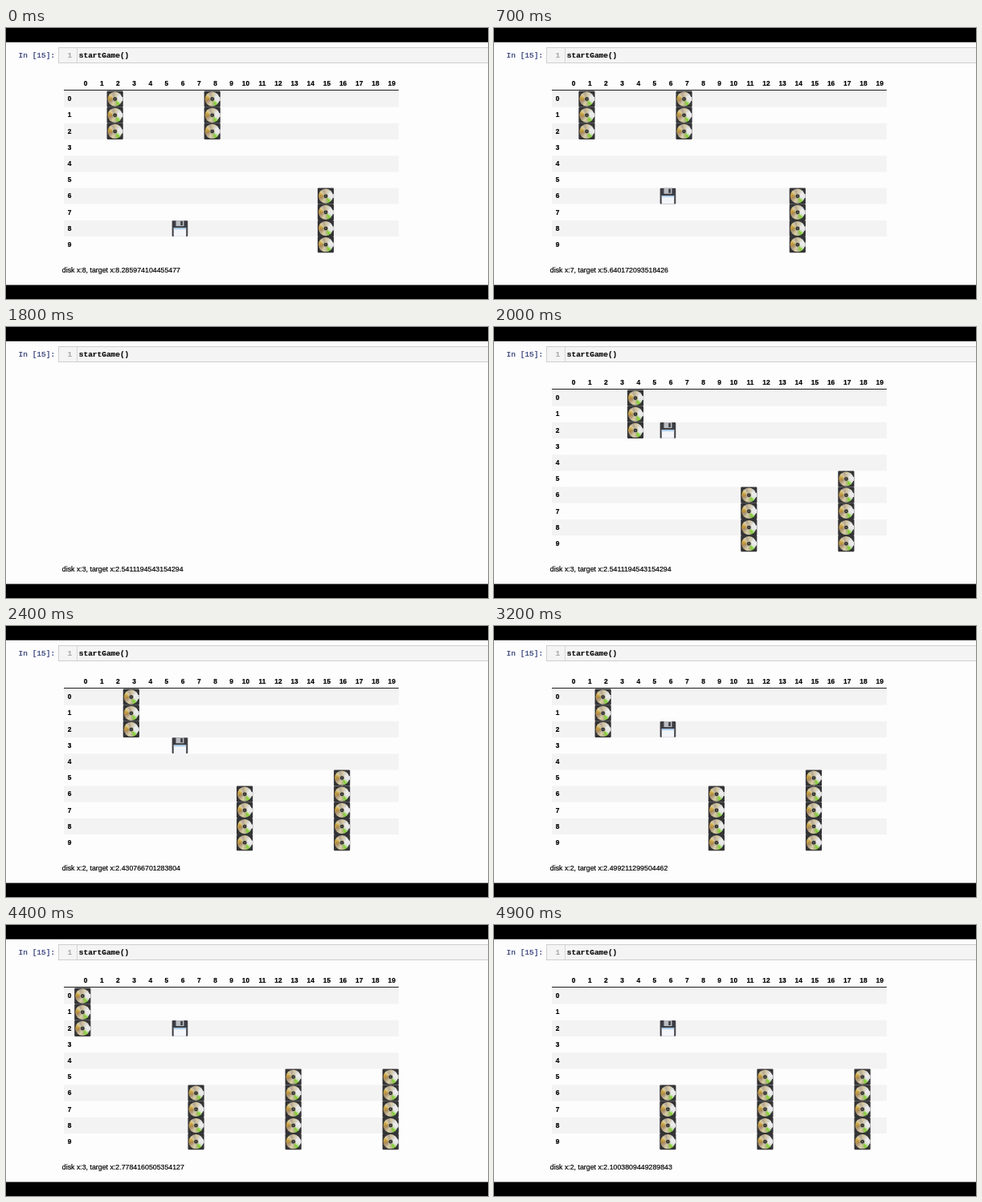
These frames come from a looping animation (600 px wide and 338 px high, 5 s). An HTML page with a canvas:

```html
<!DOCTYPE html>
<html lang="en">
<head>
<meta charset="utf-8">
<title>startGame()</title>
<style>
html, body { margin: 0; width: 100%; height: 100%; overflow: hidden; background: #000; }
canvas { display: block; }
</style>
</head>
<body>
<canvas id="stage" width="600" height="338"></canvas>
<script>
const ctx = document.getElementById('stage').getContext('2d');
const LOOP = 5000, CELL = 20.18, LEFT = 85.2, TOP = 78.5, RIGHT = LEFT + 20 * CELL;
const SANS = '"Liberation Sans", Arial, sans-serif';
const MONO = '"Liberation Mono", "Courier New", monospace';

// Start column, first row, last row of each obstacle
const pipes = [[2, 0, 2], [8, 0, 2], [15, 6, 9], [21, 5, 9], [27, 5, 9]];

// Time, floppy row (null = table cleared), scroll, reported x, target x
const steps = [
  [0, 8, 0, 8, '8.285974104455477'],
  [100, 7, 0, 8, '6.912640358127754'],
  [500, 6, 1, 7, '5.640172093518426'],
  [900, 5, 1, 6, '4.583920174463058'],
  [1100, 4, 1, 5, '3.817204659130275'],
  [1200, 4, 2, 5, '3.817204659130275'],
  [1400, 3, 2, 4, '3.0499017215576845'],
  [1600, 3, 3, 3, '2.7361840295174638'],
  [1800, null, 3, 3, '2.5411194543154294'],
  [1900, 2, 4, 3, '2.5411194543154294'],
  [2100, 2, 4, 2, '2.401835529174603'],
  [2300, 3, 5, 2, '2.401835529174603'],
  [2400, 3, 5, 2, '2.430766701283804'],
  [2700, 2, 5, 3, '2.468213905741628'],
  [3100, 2, 6, 3, '2.487350162948571'],
  [3200, 2, 6, 2, '2.499211299504462'],
  [3500, 3, 7, 2, '2.618497203516849'],
  [3900, 3, 8, 2, '2.7140358261940573'],
  [4400, 2, 8, 3, '2.7784160505354127'],
  [4600, 2, 9, 3, '2.3917058246103958'],
  [4900, 2, 9, 2, '2.1003809449289843']
];

function rect(color, x, y, w, h, radius = 0) {
  ctx.fillStyle = color;
  ctx.beginPath();
  ctx.roundRect(x, y, w, h, radius);
  ctx.fill();
}

function circle(color, x, y, r) {
  ctx.fillStyle = color;
  ctx.beginPath();
  ctx.arc(x, y, r, 0, Math.PI * 2);
  ctx.fill();
}

// A hairline stroke gives the slightly heavy look of smoothed type
function text(str, x, y, font, color = '#000', align = 'left') {
  ctx.font = font;
  ctx.fillStyle = ctx.strokeStyle = color;
  ctx.lineWidth = 0.2;
  ctx.textAlign = align;
  ctx.fillText(str, x, y);
  ctx.strokeText(str, x, y);
}

function inCell(col, row, draw) {
  ctx.save();
  ctx.translate(LEFT + col * CELL, TOP + row * CELL);
  draw();
  ctx.restore();
}

const discColors = ['#e9e9e9', '#dfe3da', '#7fd02c', '#b9b88c', '#d9cfa6', '#b8a488', '#a98a55',
  '#c99f3c', '#d9cd9a', '#b3a596', '#d2c49c', '#d5d2c6', '#ececec', '#e9e9e9'];

function disc() {
  rect('#343436', 0, 0, CELL, CELL, 1.2);
  const shine = ctx.createConicGradient(0, 10.1, 10.1);
  discColors.forEach((c, i) => shine.addColorStop(i / (discColors.length - 1), c));
  circle(shine, 10.1, 10.1, 9.1);
  rect('#e9e9e9', 17, 7.5, 3, 5);
  circle('#b5ae98', 10.1, 10.1, 3.2);
  circle('#2c2b28', 10.1, 10.1, 2.3);
  circle('#8d8d88', 10.1, 10.1, 0.8);
}

function floppy() {
  rect('#3c3d42', 0.4, 0.2, 19.6, 19.8, 1);
  rect('#b9bcc0', 5.2, 0.2, 10, 7);
  rect('#3c3d42', 11, 1, 2.6, 5.2);
  rect('#f3f5f8', 2.4, 9.4, 15.6, 10.6);
  rect('#a8cdee', 2.4, 9.4, 15.6, 1.8);
}

function drawTable(floppyRow, scroll) {
  const font = 'bold 8.4px ' + SANS;
  for (let row = 0; row < 10; row++) {
    const y = TOP + row * CELL;
    if (row % 2 === 0) rect('#f4f3f4', 72, y, RIGHT - 72, CELL);
    text(row, 81.3, y + 12.8, font, '#000', 'right');
  }
  for (let col = 0; col < 20; col++) {
    text(col, LEFT + (col + 1) * CELL - 4, 72.1, font, '#000', 'right');
  }
  rect('#1c1c1c', 72, 77, RIGHT - 72, 1);
  for (const [start, first, last] of pipes) {
    const col = start - scroll;
    if (col < 0 || col > 19) continue;
    for (let row = first; row <= last; row++) inCell(col, row, disc);
  }
  inCell(6, floppyRow, floppy);
}

function drawNotebook() {
  rect('#000', 0, 0, 600, 338);
  rect('#fefdfe', 0, 17.7, 600, 302.9);
  rect('#cfcfcf', 65, 24, 535, 20);
  rect('#f5f4f5', 66, 25, 534, 18);
  rect('#cfcfcf', 88, 25, 0.8, 18);
  text('In [15]:', 15.6, 37, '9.47px ' + MONO, '#27346f');
  text('1', 76.4, 37, '9.47px ' + MONO, '#999');
  text('startGame()', 90.8, 37, 'bold 9.47px ' + MONO, '#111');
}

function frame(now) {
  const time = now % LOOP;
  const [, row, scroll, x, target] = steps.findLast(step => step[0] <= time);
  drawNotebook();
  if (row !== null) drawTable(row, scroll);
  text(`disk x:${x}, target x:${target}`, 69.8, 304.9, '8.8px ' + SANS);
  requestAnimationFrame(() => frame(performance.now()));
}
frame(0);
</script>
</body>
</html>
```
